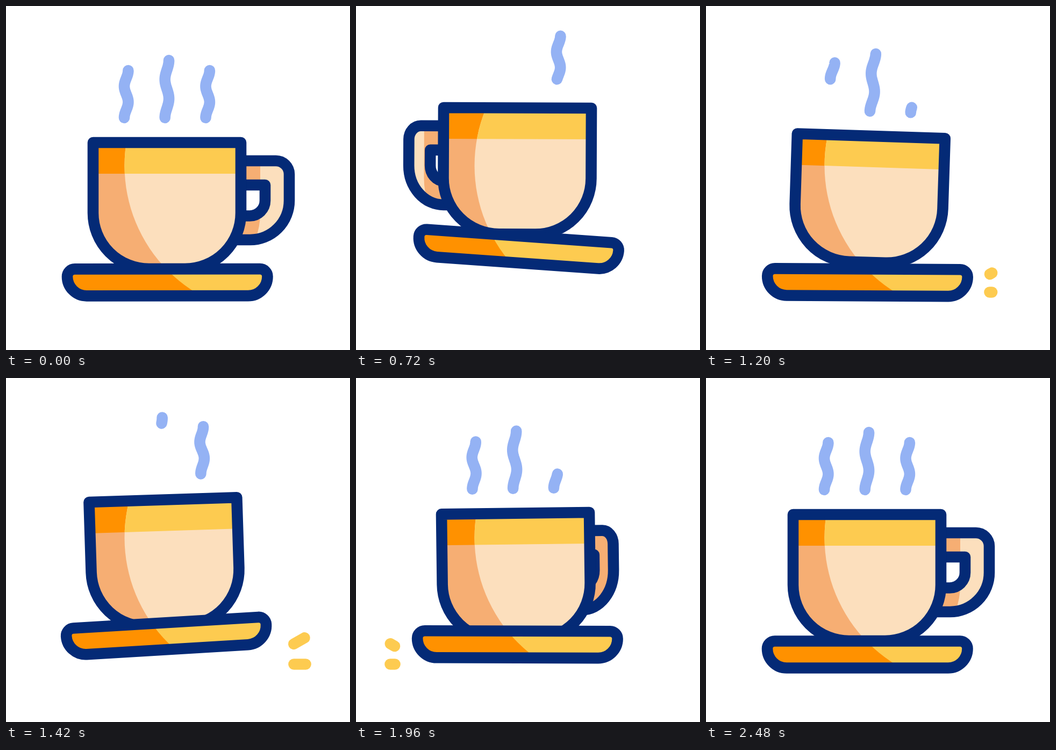
Recreate the animation shown at these times as an HTML page with a canvas. Size 640 by 640 pixels, loop 3.02 s.

```html
<!DOCTYPE html>
<html lang="en">
<head>
<meta charset="utf-8">
<title>Bouncing cup</title>
<style>
  html, body { margin: 0; width: 100%; height: 100%; overflow: hidden; background: #fff; }
  canvas { display: block; width: 640px; height: 640px; }
</style>
</head>
<body>
<canvas id="stage" width="640" height="640"></canvas>
<script>
const ctx = document.getElementById('stage').getContext('2d');
const LOOP = 3020, END = 2480, CUP_LAG = 64, STROKE = 20.6, AXIS = 299.5;
const NAVY = '#042a76', ORANGE = '#ff9100', YELLOW = '#fdcb50';
const PEACH = '#fcdfbd', TAN = '#f6ae73', STEAM = '#94b2f4';

const clamp = v => Math.max(0, Math.min(1, v));
const ramp = (t, start, length) => clamp((t - start) / length);

// Ballistic hops: start, apex, landing, height
const HOPS = [[0, 550, 1200, 66.3], [1200, 1560, 1890, 40.3], [1890, 2040, 2416, 26]];
function lift(t) {
  const hop = HOPS.find(([a, , b]) => t >= a && t < b);
  if (!hop) return 0;
  const [start, apex, land, height] = hop;
  const d = (t - apex) / (t < apex ? apex - start : land - apex);
  return height * (1 - d * d);
}

// Alternating sine lobes between zero crossings, in degrees
const SAUCER_ROCK = { zeros: [0, 593, 1210, 1950, 2480], peaks: [-7, 6.7, -4.4, 2.5] };
const CUP_ROCK = { zeros: [120, 710, 1290, 2010, 2480], peaks: [-4, 4, -3.35, 1.5] };
function tilt({ zeros, peaks }, t) {
  const i = peaks.findIndex((_, n) => t >= zeros[n] && t < zeros[n + 1]);
  if (i < 0) return 0;
  const u = (t - zeros[i]) / (zeros[i + 1] - zeros[i]);
  return peaks[i] * Math.sin(Math.PI * u) * Math.PI / 180;
}

// Horizontal reach of the handle as the cup spins
const SPIN = [[0, 1], [830, -0.97], [1785, 1], [2110, 0.64], [END, 1]];
function handleReach(t) {
  const i = SPIN.findIndex(([time]) => time > t);
  if (i < 0) return 1;
  const [t0, a] = SPIN[i - 1], [t1, b] = SPIN[i];
  return a + (b - a) * (0.5 - 0.5 * Math.cos(Math.PI * (t - t0) / (t1 - t0)));
}

const cup = new Path2D('M162 254H437V385A104 104 0 0 1 333 489H266A104 104 0 0 1 162 385Z');
const saucer = new Path2D('M128 489.5H472.5A14 14 0 0 1 486.5 503.5A36 36 0 0 1 450.5 539.5H150A36 36 0 0 1 114 503.5A14 14 0 0 1 128 489.5Z');
const handleOuter = new Path2D('M400 288H502A25 25 0 0 1 527 313V362A73 73 0 0 1 454 435H400Z');
const handleInner = new Path2D('M400 333H482V362A28.5 28.5 0 0 1 453.5 390.5H400Z');

const light = new Path2D();
light.arc(497.5, 297, 277, 0, 7);

function stroke(path, color = NAVY, width = STROKE) {
  ctx.strokeStyle = color;
  ctx.lineWidth = width;
  ctx.stroke(path);
}
function fill(path, color, rule = 'nonzero') {
  ctx.fillStyle = color;
  ctx.fill(path, rule);
}
function pose(pivotY, angle, up) {
  ctx.translate(AXIS, pivotY - up);
  ctx.rotate(angle);
  ctx.translate(-AXIS, -pivotY);
}
function scoped(draw) {
  ctx.save();
  draw();
  ctx.restore();
}

function drawHandle(reach) {
  const squeeze = new DOMMatrix([reach, 0, 0, 1, AXIS * (1 - reach), 0]);
  const outer = new Path2D(), inner = new Path2D(), band = new Path2D();
  outer.addPath(handleOuter, squeeze);
  inner.addPath(handleInner, squeeze);
  band.addPath(outer);
  band.addPath(inner);
  fill(band, PEACH, 'evenodd');
  scoped(() => {
    ctx.clip(band, 'evenodd');
    stroke(cup, TAN, 72);
  });
  stroke(outer);
  stroke(inner);
}

function drawCupBody(place) {
  const paint = (body, band) => {
    fill(cup, body);
    ctx.fillStyle = band;
    ctx.fillRect(162, 254, 275, 58);
  };
  scoped(() => {
    place();
    paint(TAN, ORANGE);
  });
  // The light stays fixed on the stage while the cup moves through it
  scoped(() => {
    ctx.clip(light);
    place();
    paint(PEACH, YELLOW);
  });
  scoped(() => {
    place();
    stroke(cup);
  });
}

function drawSaucer(place) {
  scoped(() => {
    place();
    fill(saucer, ORANGE);
  });
  scoped(() => {
    ctx.clip(light);
    place();
    fill(saucer, YELLOW);
  });
  scoped(() => {
    place();
    stroke(saucer);
  });
}

// Times at which each wisp starts to: leave, return, leave, return
const WISPS = [
  { x: 223.7, y: 120, h: 88, times: [220, 735, 1045, 1510] },
  { x: 299.4, y: 101, h: 107, times: [460, 960, 1205, 1700] },
  { x: 375.2, y: 120, h: 88, times: [700, 1175, 1445, 1890] }
];
function drawWisp({ x, y, h, times }, t) {
  let top = 0, bottom = 1;
  const step = times.filter(start => t >= start).length;
  if (step) {
    const p = ramp(t, times[step - 1], 240);
    if (step % 2) bottom = 1 - p;
    else top = 1 - p;
  }
  if (bottom - top < 0.001) return;
  const line = new Path2D();
  for (let i = 0; i <= 40; i++) {
    const s = top + (bottom - top) * i / 40;
    line.lineTo(x + 3.7 * Math.cos(3 * Math.PI * s), y + h * s);
  }
  stroke(line, STEAM);
}

function drawSplash(age, mirrored) {
  const head = ramp(age, 0, 350), tail = ramp(age, 190, 355);
  if (head <= tail) return;
  scoped(() => {
    if (mirrored) ctx.transform(-1, 0, 0, 1, 600, 0);
    for (const [x, y, dx, dy] of [[528, 499, 37, -21], [527.5, 532.5, 40.5, 0]]) {
      const line = new Path2D();
      line.moveTo(x + dx * tail, y + dy * tail);
      line.lineTo(x + dx * head, y + dy * head);
      stroke(line, YELLOW);
    }
  });
}

function render(t) {
  ctx.fillStyle = '#fff';
  ctx.fillRect(0, 0, 640, 640);
  ctx.lineJoin = ctx.lineCap = 'round';
  const placeCup = () => pose(495, tilt(CUP_ROCK, t), lift(t - CUP_LAG));
  const placeSaucer = () => pose(540, tilt(SAUCER_ROCK, t), lift(t));

  scoped(() => {
    placeCup();
    drawHandle(handleReach(t));
    WISPS.forEach(wisp => drawWisp(wisp, t));
  });
  drawCupBody(placeCup);
  drawSaucer(placeSaucer);
  drawSplash(t - 1161, false);
  drawSplash(t - 1883, true);
}

const begin = performance.now();
function tick() {
  render(Math.min((performance.now() - begin) % LOOP, END));
  requestAnimationFrame(tick);
}
tick();
</script>
</body>
</html>
```
